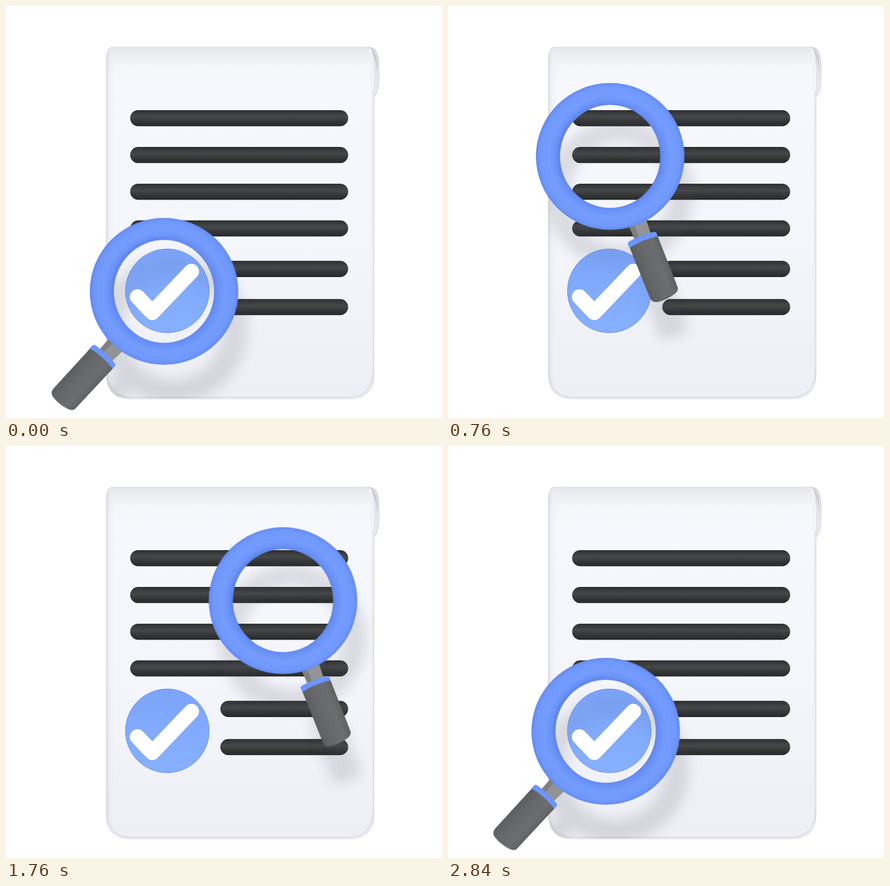
An HTML page that plays this animation: 769 px wide and 728 px high, repeating every 2.88 s.

```html
<!DOCTYPE html>
<html lang="en">
<head>
<meta charset="utf-8">
<title>Document check</title>
<style>
  html, body { margin: 0; width: 100%; height: 100%; overflow: hidden; background: #fff; }
  svg { display: block; width: 100%; height: 100%; }
</style>
</head>
<body>
<svg viewBox="0 0 769 728">
  <defs>
    <linearGradient id="sheet" x1="0" y1="73" x2="0" y2="694" gradientUnits="userSpaceOnUse">
      <stop offset="0" stop-color="#e6e7ec"/>
      <stop offset=".025" stop-color="#eeeff3"/>
      <stop offset=".065" stop-color="#f6f7fb"/>
      <stop offset=".12" stop-color="#f7f8fd"/>
      <stop offset=".55" stop-color="#f5f6fb"/>
      <stop offset=".8" stop-color="#f1f2f7"/>
      <stop offset="1" stop-color="#eeeff5"/>
    </linearGradient>
    <linearGradient id="sides">
      <stop offset="0" stop-color="#c9cad2" stop-opacity=".55"/>
      <stop offset=".012" stop-color="#e6e7ee" stop-opacity=".4"/>
      <stop offset=".04" stop-color="#f4f5fa" stop-opacity="0"/>
      <stop offset=".98" stop-color="#fff" stop-opacity="0"/>
      <stop offset="1" stop-color="#d9dae1" stop-opacity=".6"/>
    </linearGradient>
    <linearGradient id="curl" x1="0" y1="73" x2="0" y2="162" gradientUnits="userSpaceOnUse">
      <stop offset="0" stop-color="#d6d7dc"/>
      <stop offset=".45" stop-color="#e6e7ec"/>
      <stop offset="1" stop-color="#e9eaef"/>
    </linearGradient>
    <linearGradient id="bar" x1="0" y1="0" x2="0" y2="1">
      <stop offset="0" stop-color="#2c2e2f"/>
      <stop offset=".25" stop-color="#3d3f40"/>
      <stop offset=".42" stop-color="#454748"/>
      <stop offset=".7" stop-color="#343637"/>
      <stop offset="1" stop-color="#272929"/>
    </linearGradient>
    <linearGradient id="badge" x1="0" y1="0" x2="0" y2="1">
      <stop offset="0" stop-color="#7ca4fa"/>
      <stop offset="1" stop-color="#87b0ff"/>
    </linearGradient>
    <radialGradient id="tube" cx="0" cy="0" r="131" gradientUnits="userSpaceOnUse">
      <stop offset=".67" stop-color="#5f85ea"/>
      <stop offset=".73" stop-color="#6a91f7"/>
      <stop offset=".82" stop-color="#759dff"/>
      <stop offset=".94" stop-color="#7199fd"/>
      <stop offset="1" stop-color="#6289ee"/>
    </radialGradient>
    <linearGradient id="wall" x1="0" y1="0" x2=".7" y2=".7">
      <stop offset="0" stop-color="#4d72d6" stop-opacity=".3"/>
      <stop offset=".6" stop-color="#4d72d6" stop-opacity="0"/>
    </linearGradient>
    <linearGradient id="grip">
      <stop offset="0" stop-color="#5c5d5e"/>
      <stop offset=".3" stop-color="#666768"/>
      <stop offset=".75" stop-color="#6c6d6e"/>
      <stop offset="1" stop-color="#606162"/>
    </linearGradient>
    <path id="page" d="M187 73H640Q649 84 649 112V650Q649 694 605 694H220Q177 694 177 650V100Q177 73 187 73Z"/>
    <ellipse id="disc" cx="284.5" cy="503.3" rx="73.8" ry="74"/>
    <clipPath id="onPage"><use href="#page"/></clipPath>
    <clipPath id="onDisc"><use href="#disc"/></clipPath>
    <filter id="soft" x="-40%" y="-40%" width="180%" height="180%"><feGaussianBlur stdDeviation="11"/></filter>
    <path id="ring" fill-rule="evenodd" d="M-131 0A131 129.7 0 0 1 131 0A131 129.7 0 0 1-131 0ZM-88.4 0A88.4 91 0 0 0 88.4 0A88.4 91 0 0 0-88.4 0Z"/>
  </defs>

  <path d="M636 73H643C653 74 658 86 658 106V126C658 145 655 157 647 163Z" fill="url(#curl)" stroke="#d3d4da"/>
  <path d="M645 78Q654 86 655 108V122Q654 96 645 78Z" fill="#c5c6cc"/>
  <use href="#page" fill="url(#sheet)"/>
  <use href="#page" fill="url(#sides)" stroke="#d2d3d9"/>
  <path d="M179 648Q180 691 220 691H605Q645 691 647 648" fill="none" stroke="#dfe0e6" stroke-width="2"/>
  <path d="M641 75Q648 88 648 118V150" fill="none" stroke="#fafafd" stroke-width="2"/>

  <g id="bars" fill="url(#bar)"></g>
  <g clip-path="url(#onPage)">
    <g id="shadow" fill="#4a4a55" opacity=".16" filter="url(#soft)">
      <use href="#ring"/>
      <path class="turn" d="M-14 122H18V154H27V262Q27 270 19 270H-14Q-25 270-25 262L-26 154H-14Z"/>
    </g>
  </g>
  <use href="#disc" fill="url(#badge)" stroke="#6790ea"/>
  <g clip-path="url(#onDisc)"><use href="#shadow" opacity=".4"/></g>
  <path d="M232 514L258 541.5L327 469" fill="none" stroke="#fff" stroke-width="27" stroke-linecap="round" stroke-linejoin="round"/>

  <g id="glass">
    <g class="turn">
      <path d="M-14 118H19L17 158H-13Z" fill="#929394"/>
      <path d="M-14 118H-4L-5 158H-13Z" fill="#7d7e7f"/>
      <path d="M-26.5 158Q0 153 27 158V258Q27 264 20 267Q2 273-16 270Q-25 268-25.5 259Z" fill="url(#grip)"/>
      <path d="M-27 156Q-27 153-23 152Q0 149 23 152Q27 153 27 156V162Q0 157-27 163Z" fill="#6b95fb"/>
    </g>
    <use href="#ring" fill="url(#tube)"/>
    <ellipse rx="91.5" ry="94" fill="none" stroke="url(#wall)" stroke-width="6"/>
  </g>
</svg>
<script>
const LOOP = 2880;
const $ = s => document.querySelector(s);
const turning = document.querySelectorAll('.turn');

const rows = [[219, 198.2], [219, 263.3], [219, 328.2], [219, 393], [378, 464.6], [378, 532]];
$('#bars').innerHTML = rows.map(([x, y]) =>
  `<rect x="${x}" y="${y - 14.3}" width="${603.5 - x}" height="28.6" rx="14.3"/>`).join('');

// Each track: start value, then eased moves [from ms, to ms, value]
const tracks = {
  x: [278.7, [0, 700, 286], [930, 1875, 497], [2130, 2850, 278]],
  y: [504.2, [0, 700, 265.8], [930, 1875, 273.5], [2130, 2850, 504.2]],
  angle: [43, [0, 700, -21.3], [2200, 2850, 43]]
};

function ease(u) {
  u = Math.min(1, Math.max(0, u));
  return u * u * (3 - 2 * u);
}

function valueAt([start, ...moves], t) {
  return moves.reduce((v, [from, to, end]) => v + (end - v) * ease((t - from) / (to - from)), start);
}

function render(t) {
  const x = valueAt(tracks.x, t), y = valueAt(tracks.y, t), angle = valueAt(tracks.angle, t);
  $('#glass').setAttribute('transform', `translate(${x} ${y})`);
  $('#shadow').setAttribute('transform', `translate(${x + 16} ${y + 66})`);
  turning.forEach(el => el.setAttribute('transform', `rotate(${angle})`));
}

const begin = performance.now();
function tick() {
  render((performance.now() - begin) % LOOP);
  requestAnimationFrame(tick);
}
tick();
</script>
</body>
</html>
```
